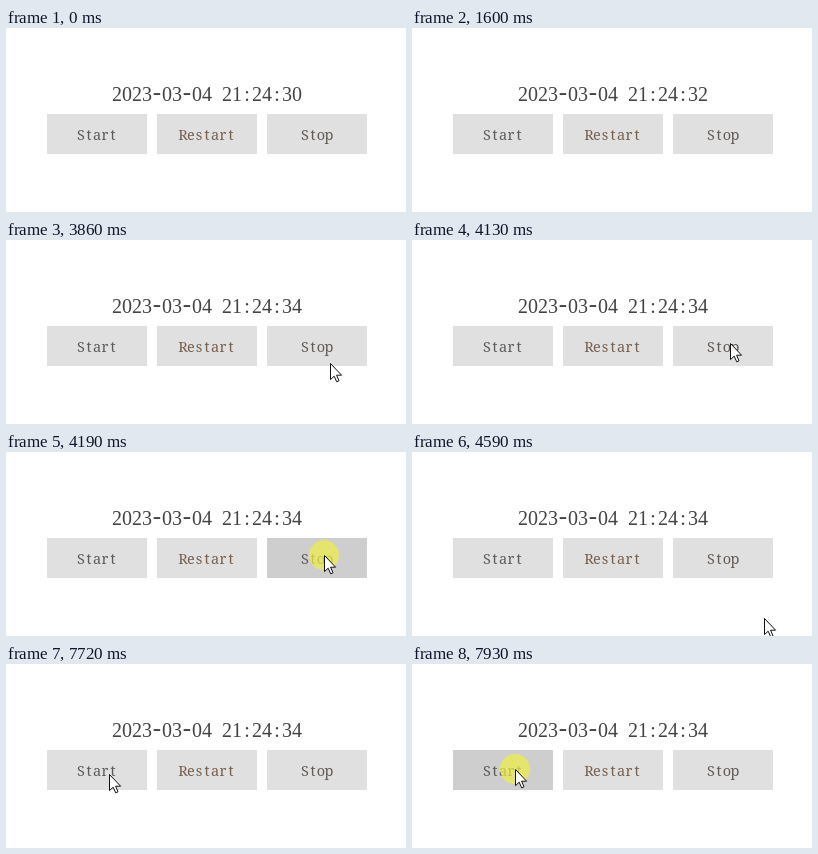
These frames come from a looping animation (400 by 184 pixels, 8000 ms). An HTML page:

```html
<!DOCTYPE html>
<html lang="en">
<head>
<meta charset="utf-8">
<title>Clock</title>
<style>
  html, body { margin: 0; width: 100%; height: 100%; overflow: hidden; background: #fff; }
  svg { display: block; width: 400px; height: 184px; overflow: hidden; }
  text { text-anchor: middle; }
  #clock { font: 20px "Liberation Serif", "Noto Serif", serif; fill: #444; }
  #buttons { font: 14.5px "Noto Serif", "Liberation Serif", serif; }
  .dash { font-size: 25px; }
</style>
</head>
<body>
<svg viewBox="0 0 400 184">
  <text id="clock"></text>
  <g id="buttons"></g>
  <circle id="halo" r="15" fill="#efef45" fill-opacity=".7"/>
  <path id="pointer" d="M.5 .5V16.6L4.2 13.2L6.7 18.8L9 17.8L6.6 12.2H11.6Z"
        fill="#fff" stroke="#111" stroke-width="1"/>
</svg>
<script>
const LOOP = 8000, STEP = 68;
const REST = '#e0e0e0', DOWN = '#cecece';
const STOP = [318, 103], START = [103, 105];
const $ = id => document.getElementById(id);

function add(parent, tag, attrs) {
  const el = document.createElementNS('http://www.w3.org/2000/svg', tag);
  for (const k in attrs) el.setAttribute(k, attrs[k]);
  return parent.appendChild(el);
}

// Centre every character in a cell of equal pitch
const cells = (text, mid, pitch) =>
  [...text].map((c, i) => mid + (i - (text.length - 1) / 2) * pitch).join(' ');

const stamp = '2023-03-04 21:24:';
const sample = stamp + '00';
const clock = $('clock');
clock.setAttribute('x', cells(sample, 201, 10));
clock.setAttribute('y', [...sample].map(c => c === '-' ? 72 : 73).join(' '));
clock.innerHTML = stamp.replace(/-/g, '<tspan class="dash">-</tspan>') + '<tspan id="sec">30</tspan>';

const labels = { Start: '#5b5b5b', Restart: '#75604e', Stop: '#625b55' };
const boxes = Object.entries(labels).map(([label, fill], i) => {
  const x = 41 + 110 * i;
  const box = add($('buttons'), 'rect', { x, y: 86, width: 100, height: 40, fill: REST });
  add($('buttons'), 'text', { x: cells(label, x + 50, 8), y: 112, fill }).textContent = label;
  return box;
});

const linear = p => p;
const easeOut = p => 1 - (1 - p) ** 2;

// Pointer trips, moving once per STEP; outer ends lie below the stage
const trips = [
  { begin: 3581, steps: 7, from: [350, 212], to: STOP, ease: easeOut },
  { begin: 4390, steps: 3, from: STOP, to: [369, 197], ease: linear },
  { begin: 7181, steps: 9, from: [98, 197], to: START, ease: easeOut }
];

function pointerAt(t) {
  const trip = trips.findLast(m => t >= m.begin) || trips[0];
  const done = Math.floor((t - trip.begin) / STEP) / trip.steps;
  const k = trip.ease(Math.min(1, Math.max(0, done)));
  return trip.from.map((a, i) => Math.round(a + (trip.to[i] - a) * k));
}

function pressedAt(t) {
  if (t >= 4190 && t < 4320) return 2;
  return t >= 7930 ? 0 : -1;
}

// Ticks about once a second until stopped
const secondAt = t => 30 + Math.min(4, Math.floor((t + 406) / 996));

function draw(t) {
  const hit = pressedAt(t);
  const move = `translate(${pointerAt(t)})`;
  $('sec').textContent = secondAt(t);
  boxes.forEach((b, i) => b.setAttribute('fill', i === hit ? DOWN : REST));
  $('pointer').setAttribute('transform', move);
  $('halo').setAttribute('transform', move);
  $('halo').style.display = hit < 0 ? 'none' : '';
}

const origin = performance.now();
function tick() {
  draw((performance.now() - origin) % LOOP);
  requestAnimationFrame(tick);
}
tick();
</script>
</body>
</html>
```
